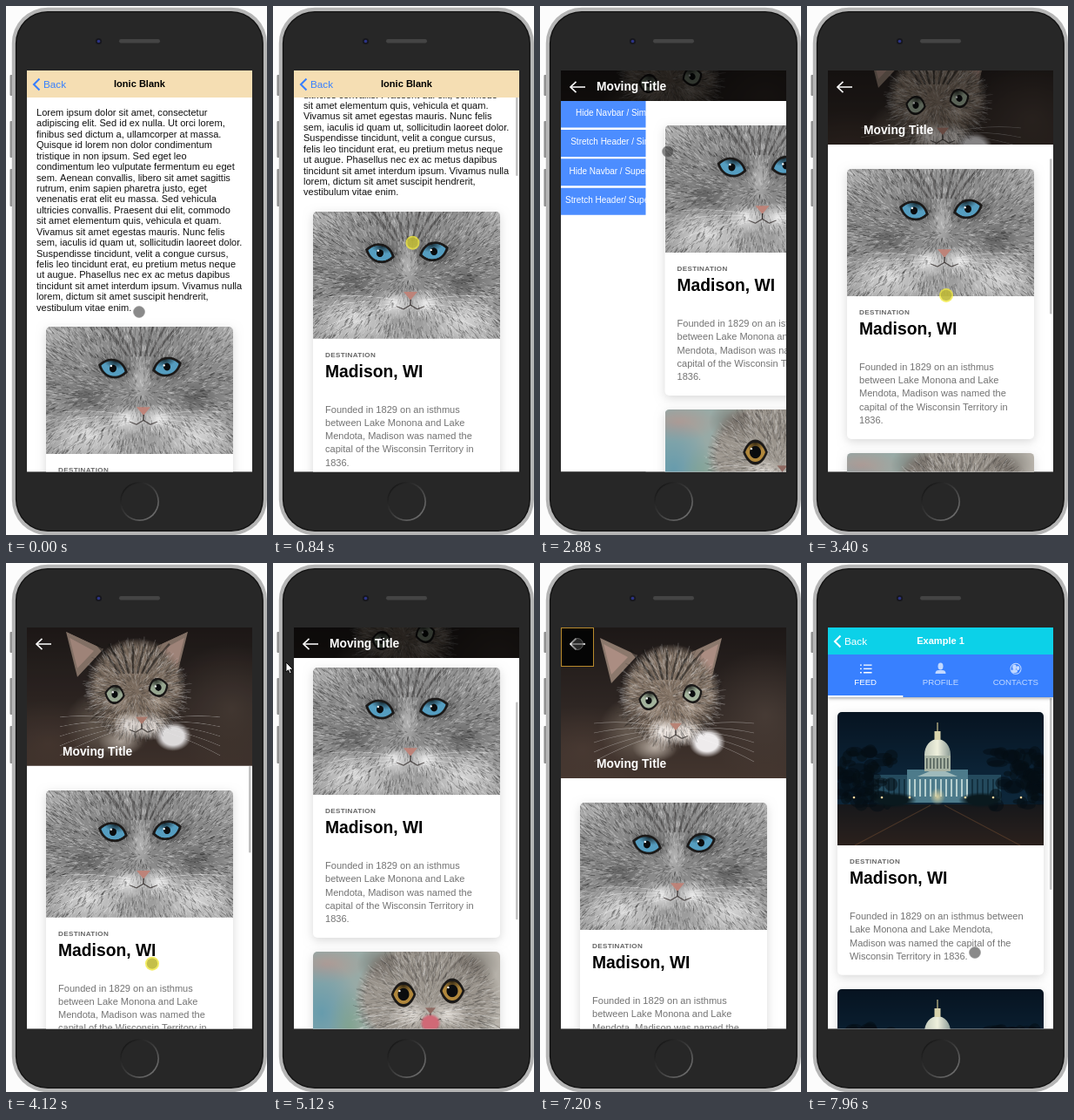
Write an HTML page with a canvas that moves like this. It is 300 px wide and 607 px high and loops after 8 s.

```html
<!DOCTYPE html>
<html lang="en">
<head>
<meta charset="utf-8">
<title>Phone demo</title>
<style>
html, body { margin: 0; width: 100%; height: 100%; overflow: hidden; background: #fcfcfc; }
canvas { display: block; width: 300px; height: 607px; }
</style>
</head>
<body>
<canvas id="stage"></canvas>
<script>
const LOOP = 8000, L = 24, T = 74, W = 259, H = 460.4, MID = 153.5, TAU = Math.PI * 2;
const canvas = document.getElementById('stage');
const dpr = window.devicePixelRatio || 1;
canvas.width = 300 * dpr;
canvas.height = 607 * dpr;
const c = canvas.getContext('2d');

let seed = 7;
const rnd = () => (seed = (seed * 16807) % 2147483647) / 2147483647;
const clamp = v => Math.max(0, Math.min(1, v));
const ease = p => 1 - (1 - clamp(p)) ** 4;

// ---------- drawing helpers ----------
function rect(g, x, y, w, h, fill, r = 0) {
  g.fillStyle = fill;
  g.beginPath();
  g.roundRect(x, y, w, h, r);
  g.fill();
}
function oval(g, x, y, rx, ry, fill) {
  g.fillStyle = fill;
  g.beginPath();
  g.ellipse(x, y, rx, ry, 0, 0, TAU);
  g.fill();
}
function trace(g, pts) {
  g.beginPath();
  for (let i = 0; i < pts.length; i += 2) g.lineTo(pts[i], pts[i + 1]);
}
function poly(g, pts, fill) {
  trace(g, pts);
  g.fillStyle = fill;
  g.fill();
}
function line(g, pts, color, width) {
  trace(g, pts);
  g.strokeStyle = color;
  g.lineWidth = width;
  g.stroke();
}
function text(str, x, y, size, color, weight = 400, align = 'left', gap = 0) {
  c.font = `${weight} ${size}px "Liberation Sans", Arial, sans-serif`;
  c.textAlign = align;
  c.letterSpacing = gap + 'px';
  c.fillStyle = color;
  c.fillText(str, x, y);
}
function fade(g, x0, y0, x1, y1, ...colors) {
  const f = g.createLinearGradient(x0, y0, x1, y1);
  colors.forEach((col, i) => f.addColorStop(i / (colors.length - 1), col));
  return f;
}
function shadowed(blur, dy, alpha, paint) {
  c.save();
  c.shadowColor = `rgba(0,0,0,${alpha})`;
  c.shadowBlur = blur * dpr;
  c.shadowOffsetY = dy * dpr;
  paint();
  c.restore();
}

// ---------- pictures ----------
function picture(w, h, paint) {
  const p = document.createElement('canvas');
  p.width = w * 2;
  p.height = h * 2;
  const g = p.getContext('2d');
  g.scale(2, 2);
  paint(g, w, h);
  return p;
}
// Soft patch of tone; solid is the share of the radius before it fades
function blob(g, x, y, rx, ry, rgb, alpha = 1, solid = 0) {
  const f = g.createRadialGradient(0, 0, solid, 0, 0, 1);
  f.addColorStop(0, `rgba(${rgb},${alpha})`);
  f.addColorStop(1, `rgba(${rgb},0)`);
  g.save();
  g.translate(x, y);
  g.scale(rx, ry);
  oval(g, 0, 0, 1, 1, f);
  g.restore();
}
// Light and dark hairs pointing away from (x, y)
function fur(g, n, x, y, rx, ry, alpha) {
  for (let i = 0; i < n; i++) {
    const a = rnd() * TAU, d = Math.sqrt(rnd()), b = a + (rnd() - .5) * .7, len = 3 + d * 9 * rnd();
    const hx = x + Math.cos(a) * d * rx, hy = y + Math.sin(a) * d * ry, v = rnd() < .5 ? 20 : 245;
    line(g, [hx, hy, hx + Math.cos(b) * len, hy + Math.sin(b) * len], `rgba(${v},${v},${v},${alpha})`, .4 + rnd() * .7);
  }
}
function stripes(g, x, y, height, alpha) {
  for (let i = -3; i <= 3; i++)
    line(g, [x + i * 5, y, x + i * 9, y - height * .5, x + i * 14, y - height], `rgba(25,22,20,${alpha})`, 2.5);
}
function whiskers(g, x, y, spread, alpha) {
  for (const side of [-1, 1]) for (let i = 0; i < 5; i++) {
    g.beginPath();
    g.moveTo(x + side * 14, y + i * 2);
    g.quadraticCurveTo(x + side * spread * .6, y - 8 + i * 7, x + side * spread, y - 4 + i * 11);
    g.strokeStyle = `rgba(255,255,255,${alpha})`;
    g.lineWidth = .6;
    g.stroke();
  }
}
function muzzle(g, x, y, size, nose) {
  poly(g, [x - size, y - size * .6, x + size, y - size * .6, x, y + size * .6], nose);
  for (const side of [-1, 1])
    line(g, [x, y + size * .5, x, y + size * 1.3, x + side * size, y + size * 1.9, x + side * size * 2, y + size * 1.5], 'rgba(40,34,32,.7)', 1.2);
}
function eye(g, x, y, rx, ry, tilt, iris, pupil) {
  const almond = (w, h) => {
    g.beginPath();
    g.moveTo(-w, 0);
    g.bezierCurveTo(-w * .5, -h * 1.35, w * .5, -h * 1.35, w, 0);
    g.bezierCurveTo(w * .5, h * 1.35, -w * .5, h * 1.35, -w, 0);
  };
  g.save();
  g.translate(x, y);
  g.rotate(tilt);
  almond(rx * 1.25, ry * 1.3);
  g.fillStyle = '#1b1918';
  g.fill();
  almond(rx, ry);
  g.clip();
  oval(g, 0, 0, rx, ry, iris);
  blob(g, 0, -ry, rx, ry, '0,0,0', .7);
  oval(g, 0, 0, pupil, pupil * 1.1, '#0a0c0e');
  oval(g, -pupil * .7, -pupil * .6, 1.2, 1.2, '#fff');
  g.restore();
}

const greyCat = picture(215, 146, (g, w, h) => {
  rect(g, 0, 0, w, h, fade(g, 0, 0, 0, h, '#8f8f8f', '#868686', '#a4a4a4'));
  for (const side of [-1, 1]) {
    blob(g, 108 + side * 105, 5, 45, 40, '190,190,190', .7);
    blob(g, 110 + side * 32, 47, 30, 20, '40,40,40', .6);
    blob(g, 110 + side * 62, 82, 32, 24, '75,75,75', .6);
    blob(g, 110 + side * 62, 124, 50, 32, '235,235,235', .75);
    blob(g, 112 + side * 18, 106, 24, 18, '250,250,250', .85);
  }
  blob(g, 109, 62, 14, 32, '200,200,200', .7);
  stripes(g, 109, 34, 34, .35);
  fur(g, 5200, 110, 75, 150, 95, .3);
  eye(g, 77, 48, 14, 8.5, .25, '#559dc0', 4);
  eye(g, 139, 46, 14, 8.5, -.25, '#559dc0', 4);
  muzzle(g, 112, 97, 8, '#bd8379');
  whiskers(g, 112, 102, 95, .5);
});

const kitten = picture(215, 146, (g, w, h) => {
  rect(g, 0, 0, w, h, fade(g, 0, 0, w, 0, '#8fa9a8', '#a3aca4', '#b7b2aa'));
  blob(g, 15, 15, 45, 22, '205,140,130', .5);
  blob(g, 10, 70, 45, 60, '85,150,175', .7);
  blob(g, 42, 90, 24, 50, '120,160,120', .5);
  blob(g, 132, 140, 95, 60, '150,145,138', 1, .7);
  blob(g, 132, 52, 84, 68, '155,149,141', 1, .85);
  for (const side of [-1, 1]) {
    blob(g, 132 + side * 52, 14, 30, 24, '95,88,82', .6);
    blob(g, 134 + side * 20, 72, 26, 18, '235,230,224', .8);
  }
  stripes(g, 132, 34, 30, .2);
  fur(g, 2400, 132, 66, 78, 70, .22);
  eye(g, 104, 49, 11.5, 11, 0, '#b0873c', 6.5);
  eye(g, 160, 45, 11.5, 11, 0, '#b0873c', 6.5);
  muzzle(g, 135, 68, 6, '#8f6a62');
  blob(g, 135, 82, 12, 11, '208,105,118', 1, .7);
  whiskers(g, 134, 70, 80, .5);
});

const tabby = picture(W, 173, (g, w, h) => {
  rect(g, 0, 0, w, h, fade(g, 0, 0, 0, h, '#1d1817', '#2e2623', '#44362f'));
  blob(g, 235, 100, 75, 75, '88,74,66', .55);
  blob(g, 25, 140, 70, 50, '84,66,58', .5);
  blob(g, 95, 118, 52, 42, '104,92,82', .9, .4);
  for (const side of [-1, 1]) {
    const x = 115 + side * 70, y = 12;
    poly(g, [x, y, x - side * 43, y + 20, x - side * 13, y + 52], '#8b786c');
    poly(g, [x - side * 4, y + 7, x - side * 32, y + 22, x - side * 13, y + 42], '#ab8d82');
  }
  blob(g, 126, 76, 57, 57, '132,116,102', 1, .82);
  stripes(g, 122, 60, 34, .55);
  for (const side of [-1, 1]) {
    blob(g, 127 + side * 40, 100, 18, 22, '70,58,50', .6);
    blob(g, 131 + side * 11, 120, 22, 17, '238,230,224', .95, .3);
    blob(g, 127 + side * 25, 92, 18, 12, '205,188,172', .6);
  }
  blob(g, 108, 138, 26, 16, '205,194,184', .8);
  blob(g, 168, 132, 21, 17, '238,235,236', 1, .6);
  fur(g, 2400, 126, 80, 54, 52, .2);
  eye(g, 101, 84, 9.5, 8.5, .15, '#a3b39c', 3.6);
  eye(g, 151, 76, 9.5, 8.5, -.3, '#a3b39c', 3.6);
  muzzle(g, 132, 114, 7, '#b88375');
  whiskers(g, 130, 114, 92, .4);
});

const nightDome = picture(237, 153, (g, w, h) => {
  const x = 115;
  rect(g, 0, 0, w, h, fade(g, 0, 0, 0, h, '#071421', '#0c2539', '#10293a'));
  rect(g, 0, 106, w, 47, fade(g, 0, 106, 0, h, '#17181b', '#2b211d'));
  rect(g, 42, 72, 146, 32, '#244a5d');
  rect(g, 80, 66, 70, 38, '#4d7b8b');
  for (let i = 46; i < 186; i += 6) rect(g, i, 77, 2, 20, Math.abs(i - x) < 36 ? '#b6cfcf' : '#13303f');
  poly(g, [x - 23, 74, x, 64, x + 23, 74], '#9fbabb');
  rect(g, x - 15, 48, 30, 20, '#a8b3a4');
  for (let i = x - 13; i < x + 14; i += 4) rect(g, i, 53, 1.6, 12, '#53615c');
  g.save();
  g.beginPath();
  g.rect(0, 0, w, 50);
  g.clip();
  oval(g, x, 49, 15, 18, fade(g, x - 15, 0, x + 15, 0, '#c3cbbd', '#eff0dd', '#8a9a95'));
  g.restore();
  rect(g, x - 3.5, 22, 7, 10, '#d9d4ad');
  rect(g, x - .6, 12, 1.2, 10, '#d0c48f');
  for (let i = 0; i < 120; i++)
    oval(g, i % 2 ? 178 + rnd() * 62 : rnd() * 62, 45 + rnd() * 62, 4 + rnd() * 8, 3 + rnd() * 6, 'rgba(5,14,20,.55)');
  for (const side of [-1, 1]) {
    blob(g, x + side * 50, 101, 26, 9, '10,25,30', 1, .6);
    for (let i = 1; i < 4; i++) oval(g, x + side * i * 32, 98, 1.3, 1.3, '#ffd9a0');
    line(g, [x + side * 8, 107, x + side * 95, h], 'rgba(170,110,65,.3)', 1);
  }
  blob(g, x, 97, 9, 10, '226,214,160', .9);
});

// ---------- content ----------
const intro = `Lorem ipsum dolor sit amet, consectetur
adipiscing elit. Sed id ex nulla. Ut orci lorem,
finibus sed dictum a, ullamcorper at massa.
Quisque id lorem non dolor condimentum
tristique in non ipsum. Sed eget leo
condimentum leo vulputate fermentum eu eget
sem. Aenean convallis, libero sit amet sagittis
rutrum, enim sapien pharetra justo, eget
venenatis erat elit eu massa. Sed vehicula
ultricies convallis. Praesent dui elit, commodo
sit amet elementum quis, vehicula et quam.
Vivamus sit amet egestas mauris. Nunc felis
sem, iaculis id quam ut, sollicitudin laoreet dolor.
Suspendisse tincidunt, velit a congue cursus,
felis leo tincidunt erat, eu pretium metus neque
ut augue. Phasellus nec ex ac metus dapibus
tincidunt sit amet interdum ipsum. Vivamus nulla
lorem, dictum sit amet suscipit hendrerit,
vestibulum vitae enim.`.split('\n');
const outro = `Aliquam a urna posuere, suscipit velit a,
eleifend dui. Maecenas eu elit mollis, maximus
sapien at, tincidunt orci. Curabitur interdum odio
tortor, ac consequat tortor tincidunt a. Cras et
egestas dui, vitae lobortis enim. Mauris varius
ultricies porttitor. In vel justo id enim volutpat
aliquam. Phasellus cursus massa vel purus
fringilla, in mattis tellus interdum.`.split('\n');
const narrow = `Founded in 1829 on an isthmus
between Lake Monona and Lake
Mendota, Madison was named the
capital of the Wisconsin Territory in
1836.`.split('\n');
const wide = `Founded in 1829 on an isthmus between
Lake Monona and Lake Mendota,
Madison was named the capital of the
Wisconsin Territory in 1836.`.split('\n');
const menu = ['Hide Navbar / Simple Tabs', 'Stretch Header / Simple Tabs',
  'Hide Navbar / Super Tabs Top', 'Stretch Header/ Super Tabs Top'];

const lines = (rows, x, y, step, color) => rows.forEach((row, i) => text(row, x, y + i * step, 11.05, color));
const bar = (y, h) => rect(c, 279, y, 2.6, h, 'rgba(120,120,120,.45)', 1.3);

function card(x, y, img, rows) {
  const w = img.width / 2, h = img.height / 2, b = y + h;
  shadowed(11, 3, .15, () => rect(c, x, y, w, h + 87.5 + rows.length * 15.3, '#fff', 5));
  c.save();
  c.beginPath();
  c.roundRect(x, y, w, h, [5, 5, 0, 0]);
  c.clip();
  c.drawImage(img, x, y, w, h);
  c.restore();
  text('DESTINATION', x + 14, b + 21, 8.1, '#666', 700, 'left', .35);
  text('Madison, WI', x + 14, b + 44, 19.3, '#000', 700);
  lines(rows, x + 14, b + 85, 15.25, '#737373');
}
function topBar(fill, title, color, back) {
  rect(c, L, T, W, 31, fill);
  text(title, MID, 93, 11.05, color, 700, 'center');
  if (!back) return;
  line(c, [38.5, 83.5, 32, 90, 38.5, 96.5], back, 2.1);
  text('Back', 43, 94, 11.74, back);
}

const list = {
  body() {
    menu.forEach((label, i) => {
      const y = 108.5 + i * 33.4;
      rect(c, L, y, W, 31, '#4c8dff');
      text(label, MID, y + 17.5, 10, '#fff', 400, 'center');
    });
  },
  head: () => topBar('#f5deb3', 'Ionic Blank', '#000')
};
const article = {
  body(s, t) {
    lines(intro, 35, 126 - s, 12.43, '#111');
    card(46, 368 - s, greyCat, narrow);
    lines(outro, 35, 705 - s, 12.43, '#111');
    card(46, 811 - s, kitten, narrow);
    if (t > 440 && t < 2160) bar(74 + s * .212, 93);
  },
  head: () => topBar('#f5deb3', 'Ionic Blank', '#000', '#3880ff')
};
const stretch = {
  body(s, t) {
    card(46, 275 - s, greyCat, narrow);
    card(46, 601 - s, kitten, narrow);
    if (t > 3000 && s > 0) bar(Math.max(109, 247 - s) + s * s * .0021, 84 + s * 1.07);
  },
  head(s, t) {
    const k = Math.min(s, 138), bottom = 247 - k;
    c.save();
    c.beginPath();
    c.rect(L, T, W, bottom - T);
    c.clip();
    c.drawImage(tabby, L, T - k / 2, W, 173);
    rect(c, L, T, W, 173, `rgba(0,0,0,${.7 * k / 138})`);
    c.restore();
    if (t > 7100) {
      rect(c, L, T, 38, 45, '#b98a2c');
      rect(c, L + 1, T + 1, 36, 43, '#050505');
    }
    line(c, [52, 93, 35, 93], '#fff', 1.6);
    line(c, [41.5, 86.8, 35, 93, 41.5, 99.2], '#fff', 1.6);
    text('Moving Title', 65, bottom - 12, 13.8, '#fff', 700);
  }
};
const tabs = {
  body() {
    const dim = '#c3d9ff';
    card(35, 171, nightDome, wide);
    card(35, 489, nightDome, wide);
    bar(155, 220);
    shadowed(4, 1, .4, () => rect(c, L, 105, W, 49, '#3880ff'));
    rect(c, L, 152, W / 3, 2, '#fff');
    ['FEED', 'PROFILE', 'CONTACTS'].forEach((name, i) =>
      text(name, L + W * (i + .5) / 3, 139.5, 9.66, i ? dim : '#fff', 400, 'center'));
    for (let y = 116.4; y < 126; y += 4.3) {
      rect(c, 61, y, 1.8, 1.4, '#fff');
      rect(c, 65, y, 9.5, 1.4, '#fff');
    }
    oval(c, MID, 118.5, 3, 4, dim);
    rect(c, MID - 6, 123, 12, 4, dim, [5, 5, 0, 0]);
    oval(c, 240, 121.3, 6.5, 6.5, dim);
    oval(c, 240, 121.3, 5.5, 5.5, '#3880ff');
    oval(c, 238.5, 119.5, 2.3, 3, dim);
    oval(c, 238.5, 124, 3.5, 2, dim);
    oval(c, 242.5, 120.5, 1.8, 2.5, dim);
  },
  head: () => topBar('#0cd1e8', 'Example 1', '#fff', '#fff')
};

// ---------- motion ----------
// Pointer moves: start, end, x, y, dragging. A drag scrolls the page by the same distance.
const moves = [
  [80, 280, 168, 404],
  [440, 1240, 153, 140, 1],
  [1240, 1320, 153, 230],
  [1360, 1700, 153, 494, 1],
  [1700, 1840, 150, 182],
  [2000, 2400, 46, 90],
  [2440, 2680, 147, 167],
  [2900, 3160, 160, 420],
  [3260, 3500, 160, 270, 1],
  [3500, 3840, 160, 420, 1],
  [3860, 4000, 168, 474],
  [4060, 4720, 168, 319, 1],
  [4960, 5080, 15, 114],
  [5240, 5400, 150, 430],
  [5440, 5720, 150, 330, 1],
  [5720, 5800, 150, 250],
  [5840, 6500, 150, 505, 1],
  [6660, 6780, 150, 445, 1],
  [6780, 6920, 150, 505, 1],
  [6920, 7120, 43, 93],
  [7320, 7460, 150, 190],
  [7600, 7900, 193, 447]
];

function pose(t) {
  const p = { x: 153, y: 351, scroll: 0, down: false };
  for (const [t0, t1, x, y, drag] of moves) {
    const k = clamp((t - t0) / (t1 - t0)), dy = (y - p.y) * k;
    p.x += (x - p.x) * k;
    p.y += dy;
    if (!drag) continue;
    p.scroll = Math.max(0, p.scroll - dy);
    if (t >= t0 - 40 && t < t1) p.down = true;
  }
  return p;
}

// Shows a page covering the menu by the fraction e
function cover(page, e, leaving, s, t) {
  c.save();
  c.translate(-W * .33 * e, 0);
  list.body();
  c.restore();
  if (leaving) list.head();
  c.save();
  c.translate(W * (1 - e), 0);
  rect(c, L, T, W, H, '#fff');
  page.body(s, t);
  if (leaving) page.head(s, t);
  c.restore();
  if (!leaving) page.head(s, t);
}

function screen(t, scroll) {
  c.save();
  c.beginPath();
  c.rect(L, T, W, H);
  c.clip();
  rect(c, L, T, W, H, '#fff');
  if (t < 2400) cover(article, 1, false, scroll, t);
  else if (t < 2764) cover(article, 1 - ease((t - 2400) / 340), true, scroll, t);
  else if (t < 7240) cover(stretch, ease((t - 2764) / 540), false, t < 3000 ? 138 : scroll, t);
  else if (t < 7500) cover(stretch, 1 - ease((t - 7240) / 240), true, scroll, t);
  else cover(tabs, ease((t - 7500) / 440), false, 0, t);
  c.restore();
}

function phone() {
  rect(c, 0, 0, 300, 607, '#fcfcfc');
  for (const [y, h] of [[79, 24], [132, 42], [187, 43]]) rect(c, 4.5, y, 4, h, '#8d8d8d', 1);
  rect(c, 298, 132, 3, 43, '#8d8d8d', 1);
  rect(c, 6.8, 1.8, 293.2, 605.4, '#b5b5b5', 41);
  rect(c, 10.9, 5.9, 285, 597.2, '#121212', 37);
  rect(c, 12.3, 7.3, 282.2, 594.4, '#272727', 35.6);
  oval(c, 106.5, 40.5, 3.6, 3.6, '#17171d');
  oval(c, 106.5, 40.5, 1.8, 1.8, '#2c3486');
  rect(c, 130, 38, 47, 4.5, '#444', 2.2);
  oval(c, MID, 568.5, 22.5, 22.5, fade(c, 135, 550, 171, 586, '#141414', '#3a3a3a', '#707070'));
  oval(c, MID, 568.5, 20.8, 20.8, '#272727');
}

function cursor({ x, y, down }) {
  if (x < L) {
    const arrow = [0, 0, 0, 11, 2.6, 8.8, 4.4, 13, 6.2, 12.2, 4.5, 8.2, 8, 8, 0, 0].map((v, i) => v + (i % 2 ? y : x));
    poly(c, arrow, '#fff');
    line(c, arrow, '#000', .9);
  } else if (down) {
    oval(c, x, y, 8, 8, 'rgba(240,232,60,.8)');
    oval(c, x, y, 6.2, 6.2, 'rgba(150,146,50,.5)');
  } else {
    oval(c, x, y, 6.5, 6.5, 'rgba(60,60,60,.6)');
    c.strokeStyle = 'rgba(150,150,150,.7)';
    c.lineWidth = .8;
    c.stroke();
  }
}

function frame(now) {
  const t = now % LOOP, p = pose(t);
  c.setTransform(dpr, 0, 0, dpr, 0, 0);
  phone();
  screen(t, p.scroll);
  cursor(p);
  requestAnimationFrame(frame);
}
requestAnimationFrame(frame);
</script>
</body>
</html>
```
